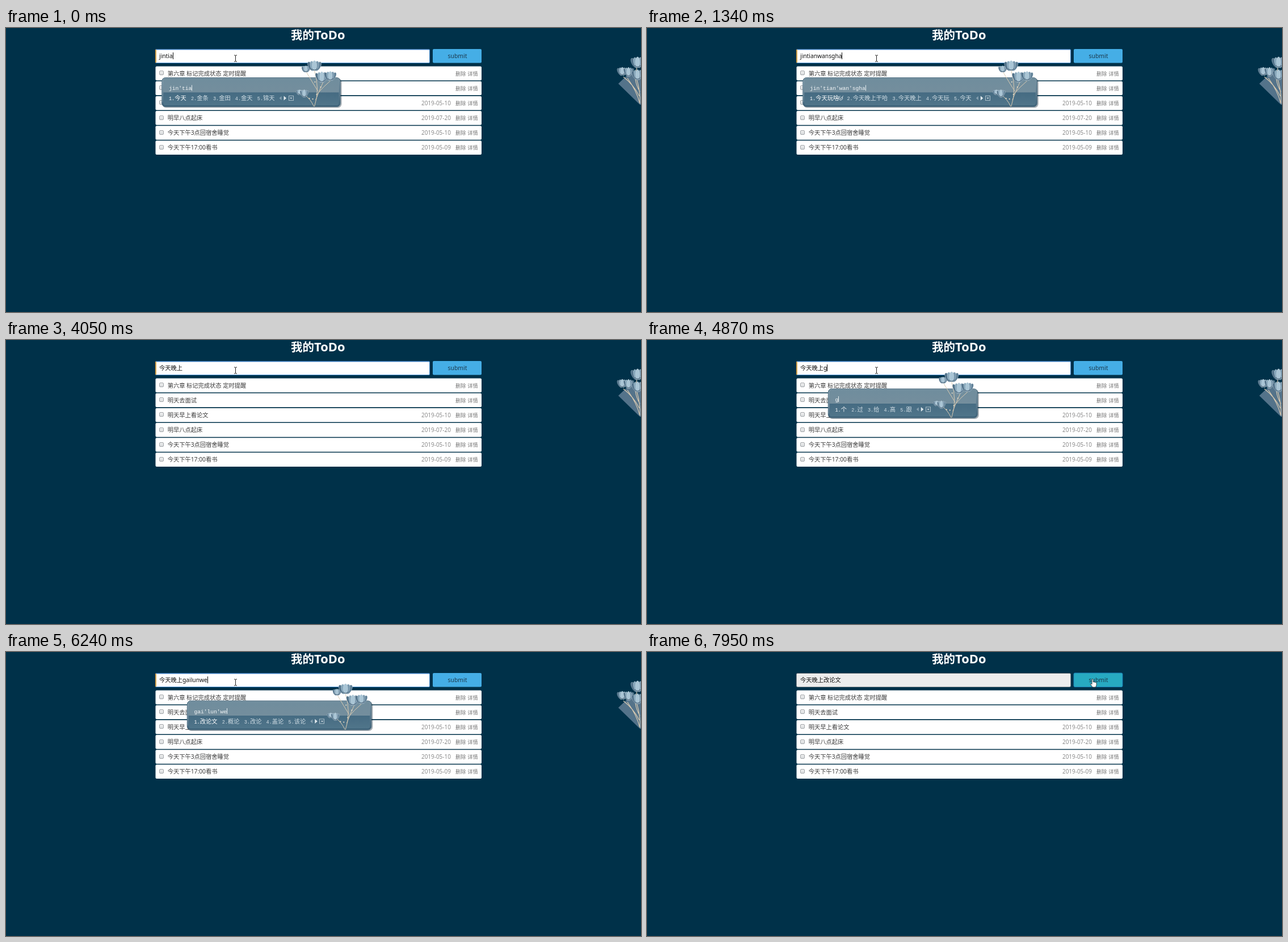
These frames come from a looping animation (1119 by 500 pixels, 8000 ms). An HTML page with a canvas:

```html
<!DOCTYPE html>
<html lang="zh-CN">
<head>
<meta charset="utf-8">
<title>我的ToDo</title>
<style>
  html, body { margin: 0; width: 100%; height: 100%; overflow: hidden; background: #003149; }
  canvas { display: block; }
</style>
</head>
<body>
<canvas id="stage" width="1119" height="500"></canvas>
<script>
const ctx = document.getElementById("stage").getContext("2d");
const LOOP = 8000;
const CJK = "'Noto Sans CJK SC', 'Noto Sans CJK', sans-serif";
const SANS = "'Noto Sans', " + CJK;
const MONO = "'Liberation Mono', monospace";
const EM = 10.25;

const TODOS = [
  ["第六章 标记完成状态 定时提醒", ""],
  ["明天去面试", ""],
  ["明天早上看论文", "2019-05-10"],
  ["明早八点起床", "2019-07-20"],
  ["今天下午3点回宿舍睡觉", "2019-05-10"],
  ["今天下午17:00看书", "2019-05-09"],
];

// [start ms, committed text, typed letters, pinyin, candidates, caret visible]; "*" marks a cloud result
const DAY = "今天 金田 金天 锦天 今填";
const DAY_W = "今天我 今天为 今天晚 今天 金天";
const EVENING = "今天网上* 今天晚上该行 今天晚上 今天玩 今天";
const GAI = "改 该 盖 概 钙";
const THEORY = "概论 改论 盖论 该论 钙论";
const STEPS = [
  [0, "", "jintia", "jin'tia", "今天 金条 金田 金天 锦天", 1],
  [120, "", "jintian", "jin'tian", DAY, 1],
  [550, "", "jintianw", "jin'tian'w", DAY, 1],
  [670, "", "jintianw", "jin'tian'w", DAY_W, 1],
  [950, "", "jintianwa", "jin'tian'wa", "今天玩 今天哇 今天挖 今天 金天", 1],
  [1080, "", "jintianwan", "jin'tian'wan", "今天玩 今天晚 今天完 今天 金天", 1],
  [1210, "", "jintianwansg", "jin'tian'wan'sg", "今天晚上* 今天晚上过 今天晚上 今天玩 今天", 1],
  [1340, "", "jintianwansgha", "jin'tian'wan'sgha", "今天玩啥* 今天晚上干哈 今天晚上 今天玩 今天", 1],
  [1620, "", "jintianwansghan", "jin'tian'wan'sghan", "今天网上* 今天晚上干寒 今天晚上 今天玩 今天", 1],
  [1770, "", "jintianwansghang", "jin'tian'wans'ghang", EVENING, 1],
  [2340, "", "jintianwansghang", "jin'tian'wans'ghang", EVENING, 0],
  [2780, "", "jintianwansghang", "jin'tian'wans'ghang", EVENING, 1],
  [3220, "今天晚上该行", "", "", "", 1],
  [3620, "今天晚上该", "", "", "", 1],
  [3740, "今天晚上该", "", "", "", 0],
  [4050, "今天晚上", "", "", "", 0],
  [4320, "今天晚上", "", "", "", 1],
  [4750, "今天晚上", "g", "g", "个 过 给 高 跟", 1],
  [4920, "今天晚上", "ga", "ga", "嘎 噶 尬 尕 咖", 1],
  [5090, "今天晚上", "gai", "gai", "嘎 噶 尬 尕 咖", 1],
  [5250, "今天晚上", "gai", "gai", GAI, 1],
  [5420, "今天晚上", "gail", "gai'l", "改了 概率 盖楼 盖了 gaily", 1],
  [5690, "今天晚上", "gailu", "gai'lu", "改路 盖路 该路 改录 概率", 1],
  [5810, "今天晚上", "gailun", "gai'lun", THEORY, 1],
  [6090, "今天晚上", "gailunw", "gai'lun'w", "改论文 概论 改论 盖论 该论", 1],
  [6240, "今天晚上", "gailunwe", "gai'lun'we", "改论文 概论 改论 盖论 该论", 1],
  [6390, "今天晚上", "gailunwen", "gai'lun'wen", "改论文 概论 改论 盖论 该论", 1],
  [6790, "今天晚上改论文", "", "", "", 1],
  [7340, "今天晚上改论文", "", "", "", 0],
];

function text(str, x, y, size, color, family = SANS, weight = "") {
  ctx.font = `${weight} ${size}px ${family}`;
  ctx.fillStyle = color;
  ctx.fillText(str, x, y);
  return ctx.measureText(str).width;
}

function rect(x, y, w, h, fill) {
  ctx.fillStyle = fill;
  ctx.fillRect(x, y, w, h);
}

function box(x, y, w, h, r, fill, stroke) {
  ctx.beginPath();
  ctx.roundRect(x, y, w, h, r);
  ctx.fillStyle = fill;
  ctx.fill();
  if (!stroke) return;
  ctx.strokeStyle = stroke;
  ctx.lineWidth = 1;
  ctx.stroke();
}

function shape(path, fill, stroke, width = 1) {
  const p = new Path2D(path);
  if (fill) { ctx.fillStyle = fill; ctx.fill(p); }
  if (stroke) { ctx.strokeStyle = stroke; ctx.lineWidth = width; ctx.stroke(p); }
}

function gradient(y0, y1, ...colors) {
  const g = ctx.createLinearGradient(0, y0, 0, y1);
  colors.forEach((c, i) => g.addColorStop(i / (colors.length - 1), c));
  return g;
}

function bloom(x, y, w, h) {
  [-2, 2, -1, 1, 0].forEach((k, i) => {
    ctx.beginPath();
    ctx.ellipse(x + k * w * .16, y + Math.abs(k) * h * .04, w * .19, h * .46, k * .25, 0, 7);
    ctx.fillStyle = ["#4f7088", "#5d7e95", "#86a7bb", "#7797ad", "#a9c5d5"][i];
    ctx.fill();
    ctx.strokeStyle = "rgba(214,226,233,.75)";
    ctx.lineWidth = .5;
    ctx.stroke();
  });
  shape(`M${x - w * .25} ${y + h * .3}q${w * .25} ${h * .25} ${w * .5} 0`, null, "#3c566b", 1);
}

function popupPlant(right, top) {
  ctx.save();
  ctx.translate(right, top);
  shape("M-46 51Q-36 22-46-12M-44 40Q-37 22-31 9M-42 30Q-30 16-18 6M-47 51Q-53 38-63 31M-40 24Q-50 8-60-9", null, "#d8cab2", 1);
  for (const [x, y] of [[-49, 38], [-42, 30], [-35, 17], [-45, 8], [-55, 37], [-43, -6]]) {
    ctx.beginPath();
    ctx.arc(x, y, 1.1, 0, 7);
    ctx.fillStyle = "#eadfca";
    ctx.fill();
  }
  bloom(-61, -15, 13, 12);
  bloom(-46, -21, 21, 19);
  bloom(-33, -1, 19, 20);
  bloom(-18, -3, 18, 17);
  bloom(-72, 26, 11, 9);
  bloom(-64, 28, 12, 14);
  ctx.restore();
}

function cornerPlant() {
  shape("M1079 98L1097 81H1119V135H1117Z", "#54738a");
  shape("M1117 133Q1112 112 1095 88M1117 133Q1118 112 1112 92M1116 120Q1106 100 1088 86M1117 112Q1104 90 1112 70", null, "#d8cab2", 1.2);
  bloom(1113, 60, 20, 20);
  bloom(1086, 76, 15, 15);
  bloom(1097, 77, 14, 17);
  bloom(1113, 82, 17, 19);
}

// One candidate in half- and full-width cells; returns the x where it ends.
function candidate(str, x, y, color) {
  for (const run of str.match(/\*|[!-~]+?(?=\*|[^!-~]|$)|[^!-~]+/g)) {
    if (run === "*") {
      shape(`M${x + 2.5} ${y - 7}a3.4 3.4 0 1 0 3.6 2M${x + 1} ${y - 4.5}l2 2 4.5-5`, null, color, .9);
      x += 6;
      continue;
    }
    const latin = /[!-~]/.test(run);
    text(run, x, y, latin ? EM / 1.2 : EM, color, latin ? MONO : CJK);
    x += run.length * EM / (latin ? 2 : 1);
  }
  return x;
}

function candidatesEnd(list, x) {
  const cells = list.join("").replace(/\*/g, "");
  const clouds = list.join("").length - cells.length;
  const halves = cells.replace(/[^!-~]/g, "").length;
  return x + (list.length + cells.length - halves / 2) * EM + clouds * 6 + (list.length - 1) * 8.2;
}

function popup(left, top, pinyin, list, tipAlpha) {
  const start = left + 12.7;
  const end = candidatesEnd(list, start);
  const right = end + 116;
  const width = right - left;

  box(left + 1, top + 1.5, width + 1, 52, 7, "rgba(0,25,40,.35)");
  box(left + .5, top + .5, width - 1, 51, 6, gradient(top, top + 52, "#7c97a5", "#628093", "#3b6077"), "#48697d");
  box(left + 3, top + 2, width - 6, 24.5, [4, 4, 0, 0], gradient(top, top + 26, "#6f8d9d", "#748e9d"));
  box(left + 3, top + 26.5, width - 6, 22.5, [0, 0, 4, 4], gradient(top + 26, top + 49, "#456b82", "#50758a"));
  rect(left + 1, top + 6, 1, 38, "rgba(190,210,220,.35)");

  text(pinyin, start, top + 22, 9.6, "#f4f7f8", MONO);
  rect(Math.round(start + pinyin.length * 5.77), top + 13.5, 1, 10, "#e6edf0");

  let x = start;
  list.forEach((word, i) => {
    x = candidate(`${i + 1}.${word}`, x, top + 40, i ? "#d0dde4" : "#ffffff") + 8.2;
  });

  const mid = top + 36.5;
  shape(`M${end + 12} ${mid - 3.5}v7l-4-3.5z`, "#86a0b0");
  shape(`M${end + 16} ${mid - 4}v8l4.5-4z`, "#e3ebef");
  ctx.strokeStyle = "#a9bdc8";
  ctx.lineWidth = 1;
  ctx.strokeRect(Math.round(end + 24) + .5, mid - 4, 8, 8);
  shape(`M${end + 26.5} ${mid - 1}h4.5l-2.2 2.5z`, "#c9d6dd");

  if (tipAlpha) {
    ctx.globalAlpha = tipAlpha;
    ctx.beginPath();
    ctx.arc(440.3, top + 18, 4.3, 0, 7);
    ctx.fillStyle = "#e2643f";
    ctx.fill();
    ctx.strokeStyle = "#f5e5de";
    ctx.lineWidth = .8;
    ctx.stroke();
    rect(439.7, top + 15.3, 1.3, 1.3, "#fff");
    rect(439.7, top + 17.3, 1.3, 3.4, "#fff");
    text("工具箱(分号)", 449, top + 21, 8, "#e2e9ed", SANS);
    ctx.globalAlpha = 1;
  }
  popupPlant(right, top);
}

function page(hover, pressed) {
  rect(0, 0, 1119, 500, "#003149");
  text("我的", 502, 19.8, 20.5, "#fff", CJK, "bold");
  text("ToDo", 543, 19.8, 21.9, "#fff", SANS, "bold");

  if (pressed) {
    box(263.5, 37.5, 483, 24, 2, "#ededed", "#8d9498");
    rect(264, 37, 482, 1, "#5d6a72");
  } else {
    box(263.5, 37.5, 483, 24, 1.5, "#fff", "#4a90d2");
    rect(264, 37, 482, 1.5, "#3d7fc0");
    rect(263, 38, 2, 23, "#d9a54c");
  }

  box(752, 37, 86, 24.5, 2, hover ? "#27aac1" : "#45aee6", pressed && "#1b80b8");
  text("submit", 778.5, 53.2, 10.4, "#1d3a4d");

  TODOS.forEach(([title, date], i) => {
    const y = 67.6 + i * 26.15;
    box(263.5, y, 574.5, 24.6, 2, "#fff");
    box(270.5, Math.round(y + 7.5) + .5, 7, 7, 1.5, gradient(y + 7, y + 16, "#f4f4f4", "#d5d8da"), "#a2a6a9");
    text(title, 284.7, y + 16.1, EM, "#3a3a3a");
    text(date, 732, y + 16, 9.95, "#8b8b8b");
    text("删除", 792, y + 16, 9.25, "#777");
    text("详情", 813.3, y + 16, 9.25, "#777");
  });
}

function beam(x, y) {
  shape(`M${x - 2.5} ${y - 5.5}h2l.5.5.5-.5h2M${x} ${y - 5}v10M${x - 2.5} ${y + 5.5}h2l.5-.5.5.5h2`, null, "#222", 1);
}

function hand(x, y) {
  shape(`M${x - 2} ${y - 6}q1.2-1.2 2.2 0v5l1.4-.4 1.2.6 1.4-.1.9.8 1 .4v4l-1.4 3.7h-5.5l-3.6-5q-.6-1.6.8-1.5l1.6 1.4z`, "#fff", "#26343c", .9);
}

function draw(t) {
  const [, committed, typed, pinyin, words, caret] = STEPS.findLast(step => step[0] <= t);
  const hover = t >= 7640;
  const pressed = t >= 7950;

  page(hover, pressed);
  const width = text(committed + typed, 270, 53, EM, "#111");
  if (t >= 2780 && t < 3220) {
    ctx.setLineDash([1.2, 1.2]);
    shape(`M270 55H${270 + width}`, null, "#e0403a", 1);
    ctx.setLineDash([]);
  }
  if (caret) rect(Math.round(270 + width), 43, 1, 12, "#111");
  if (!pressed) cornerPlant();

  const tipAlpha = t < 2050 || t >= 3220 ? 0 : Math.min(1, (1 + Math.floor((t - 2050) / 143)) / 4);
  if (words) popup(committed ? 318.8 : 274.3, committed ? 85.5 : 87, pinyin, words.split(" "), tipAlpha);

  if (hover) hand(786, 54);
  else beam(t >= 7490 ? 585 : 404.5, 53.5);
}

function tick() {
  draw(performance.now() % LOOP);
  requestAnimationFrame(tick);
}
tick();
</script>
</body>
</html>
```
